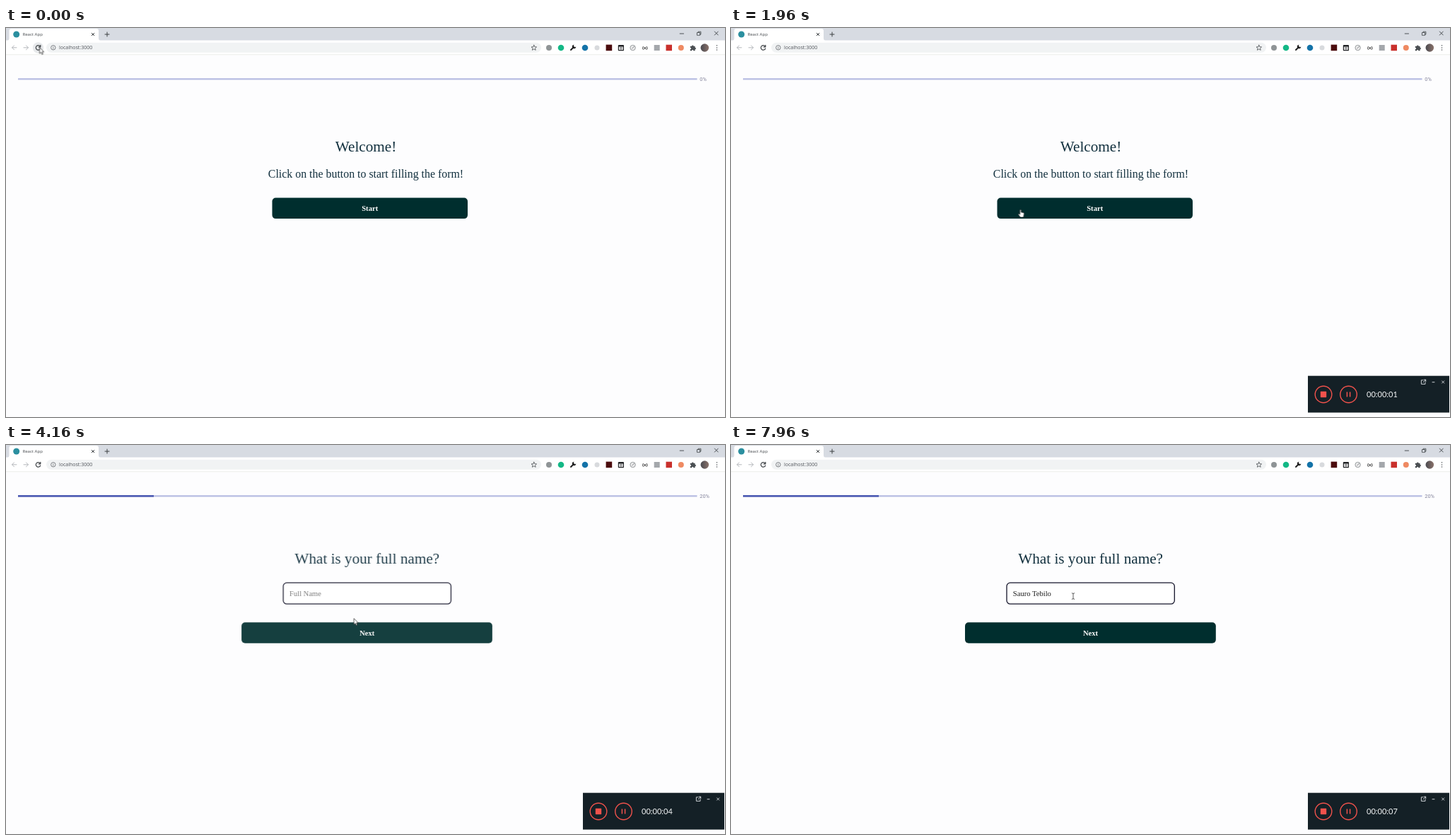
An HTML page that plays this animation: 1017 by 551 pixels, repeating every 8000 ms.

```html
<!DOCTYPE html>
<html lang="en">
<head>
<meta charset="utf-8">
<title>React App</title>
<style>
html, body { margin: 0; width: 100%; height: 100%; overflow: hidden; background: #fdfdfe; }
svg { display: block; width: 1017px; height: 551px; }
.ui { font-family: "Open Sans", "Noto Sans", sans-serif; }
.page { font-family: "Liberation Serif", "Times New Roman", serif; fill: #12303e; }
.page .btn { font-weight: bold; font-size: 10.6px; fill: #fff; }
.h { font-size: 21.2px; }
.mid { text-anchor: middle; }
.pct { font: 7.4px Roboto, sans-serif; fill: #83839b; }
.line { fill: none; stroke-linecap: round; stroke-linejoin: round; }

/* one shared 8 s cycle, held paused and seeked by the script's clock */
.a { animation: 8s linear infinite paused; }
.s { animation: 8s step-end infinite paused; }

#welcome { animation-name: welcome; }
@keyframes welcome {
  0%, 7.74% { opacity: 1; transform: none; }
  7.75%, 10.56% { opacity: 0; transform: translateX(26.5px); animation-timing-function: ease; }
  23.06%, 43.8% { opacity: 1; transform: none; }
  43.81%, 100% { opacity: 0; transform: none; }
}
#question { animation-name: question; }
@keyframes question {
  0%, 43.81% { opacity: 0; transform: translateX(26.5px); animation-timing-function: ease; }
  56.31%, 100% { opacity: 1; transform: none; }
}
#start { animation-name: hover; }
@keyframes hover { 0%, 23.5% { fill: #002e2e; } 38%, 100% { fill: #001f29; } }

#bar { animation-name: bar; }
@keyframes bar { 0%, 44.13% { transform: scaleX(0); } 49.13%, 100% { transform: scaleX(1); } }
#progress { animation-name: blank; }
@keyframes blank { 0% { visibility: visible; } 7.75% { visibility: hidden; } 10.56%, 100% { visibility: visible; } }
#pct0 { animation-name: pct0; }
@keyframes pct0 { 0% { opacity: 1; } 43.81%, 100% { opacity: 0; } }
#pct20 { animation-name: pct20; }
@keyframes pct20 { 0% { opacity: 0; } 43.81%, 100% { opacity: 1; } }

#fav { animation-name: fav; transform-origin: 14.7px 9px; }
@keyframes fav { 0% { transform: none; } 5% { transform: scale(.6); } 20%, 100% { transform: none; } }
#reload { animation-name: reload; }
@keyframes reload { 0% { opacity: 1; } 4.25% { opacity: 0; } 21.5%, 100% { opacity: 1; } }
#halt { animation-name: halt; }
@keyframes halt { 0% { opacity: 0; } 4.25% { opacity: 1; } 21.5%, 100% { opacity: 0; } }
#glow { animation-name: glow; }
@keyframes glow { 0%, 18.5% { opacity: 1; } 20.5%, 100% { opacity: 0; } }
#dim { animation-name: dim; }
@keyframes dim { 0% { opacity: 1; } 7.75% { opacity: .5; } 21.5%, 100% { opacity: 1; } }
#status { animation-name: status; }
@keyframes status { 0%, 8% { opacity: 0; } 8.5%, 21.5% { opacity: 1; } 23%, 100% { opacity: 0; } }
#rec { animation-name: rec; }
@keyframes rec { 0%, .5% { opacity: 0; } 3%, 100% { opacity: 1; } }

#mouse { animation-name: mouse; }
@keyframes mouse {
  0%, 17.5% { transform: translate(47.5px, 27.5px); animation-timing-function: ease-in-out; }
  24%, 25.5% { transform: translate(409.5px, 257px); animation-timing-function: ease-in-out; }
  36.25%, 50.5% { transform: translate(494px, 253px); animation-timing-function: ease-in-out; }
  55.5%, 100% { transform: translate(484px, 214px); }
}
#arrow { animation-name: arrow; }
@keyframes arrow { 0% { opacity: 1; } 23.3% { opacity: 0; } 51.5% { opacity: 1; } 53%, 100% { opacity: 0; } }
#hand { animation-name: hand; }
@keyframes hand { 0% { opacity: 0; } 23.3% { opacity: 1; } 51.5%, 100% { opacity: 0; } }
#beam { animation-name: beam; }
@keyframes beam { 0% { opacity: 0; } 53% { opacity: 1; } 64.5% { opacity: 0; } 99.4%, 100% { opacity: 1; } }
#ring { animation-name: ring; }
@keyframes ring {
  0%, 3%, 8.5%, 42.5%, 48%, 56.75%, 62.25%, 100% { opacity: 0; transform: scale(.2); }
  4.25%, 6.5%, 43.75%, 46%, 58%, 60.25% { opacity: 1; transform: none; }
  8.4%, 47.9%, 62.15% { opacity: 0; transform: none; }
}
</style>
</head>
<body>
<svg viewBox="0 0 1017 551">
  <rect width="1017" height="551" fill="#fdfdfe"/>

  <!-- browser frame -->
  <g class="ui">
    <rect width="1017" height="18" fill="#d7dbe2"/>
    <path d="M2 18q2.500-.5 2.500-3V4q0-3 3-3H128q3 0 3 3v11q0 2.500 2.500 3z" fill="#fff"/>
    <rect y="17.500" width="1017" height="20" fill="#fff"/>
    <rect y="37.500" width="1017" height=".7" fill="#e4e5e2"/>
    <circle id="fav" class="s" cx="14.700" cy="9" r="4.500" fill="#2b8f9f"/>
    <text x="23.400" y="11.300" font-size="6.100" fill="#45494d">React App</text>
    <g class="line" stroke="#3c4043" stroke-width="1">
      <path d="M121.200 7.200l3.600 3.600m0-3.600l-3.600 3.600M140 9h6m-3-3v6"/>
      <path d="M953.200 8h5.300M1002.300 5l5 5m0-5l-5 5" stroke-width=".9"/>
      <path d="M977.800 6.500h3.800v3.800h-3.800zM979 6.300V5.200h3.900v3.900h-1.200" stroke-width=".8"/>
    </g>
    <circle id="glow" class="a" cx="45.500" cy="28" r="7.700" fill="#e7e9eb"/>
    <g class="line" stroke="#b4b7bb" stroke-width="1">
      <path d="M15 27.800H8.500m3-3l-3 3 3 3M25 27.800h6.500m-3-3l3 3-3 3"/>
      <path id="halt" class="s" d="M42.700 25l5.600 5.600m0-5.600l-5.600 5.600" stroke="#8e9296"/>
      <path id="reload" class="s" d="M48.300 26A3.300 3.300 0 1 0 48.700 29M48.800 24.300v2.500h-2.500" stroke="#3f4347" stroke-width="1.200"/>
    </g>
    <rect x="57" y="20.800" width="700" height="14" rx="7" fill="#f1f3f4"/>
    <circle cx="66.800" cy="27.800" r="3.200" fill="none" stroke="#5f6368" stroke-width=".8"/>
    <path d="M66.800 27.300v2.200m0-3.600v.7" stroke="#5f6368" stroke-width=".8"/>
    <text x="75" y="30.300" font-size="7" fill="#50545a">localhost:3000</text>
    <path class="line" d="M746.800 24.200l1.100 2.500 2.700.2-2.100 1.800.7 2.600-2.400-1.400-2.400 1.400.7-2.600-2.100-1.800 2.700-.2z" stroke="#4a4e52" stroke-width=".8"/>

    <!-- toolbar buttons -->
    <circle cx="768" cy="28" r="4" fill="#8f9496"/>
    <circle cx="785" cy="28" r="4.300" fill="#14b886"/>
    <path class="line" d="M799 31l4-4" stroke="#222" stroke-width="2"/>
    <path d="M803.500 23.800a2.700 2.700 0 1 0 2.700 2.700l-1.900.7-1.500-1.500z" fill="#222"/>
    <circle cx="819" cy="28" r="4.300" fill="#1473a8"/>
    <circle cx="836" cy="28" r="3.500" fill="#d8dadd"/>
    <rect id="dim" class="s" x="848.600" y="23.600" width="8.600" height="8.600" fill="#4b0b0d"/>
    <rect x="865.800" y="24" width="8.200" height="8.200" rx="1" fill="#202124"/>
    <path d="M867 26.500h5.800v4.500H867z" fill="#fff"/>
    <path d="M868 27.700h3.800m-3.800 2h3.800" stroke="#202124" stroke-width=".8"/>
    <circle cx="886.600" cy="28" r="3.700" fill="#eee" stroke="#8c9094" stroke-width=".9"/>
    <path class="line" d="M885.800 29l2.600-3" stroke="#75797d" stroke-width=".9"/>
    <text class="mid" x="903.800" y="30" font-size="6" font-weight="700" fill="#333">{x}</text>
    <rect x="916.700" y="24" width="8" height="8" fill="#a4a7ab"/>
    <rect x="933.500" y="23.700" width="8.500" height="8.500" fill="#c9302c"/>
    <circle cx="954.800" cy="28" r="4" fill="#ef8a62"/>
    <path d="M967.800 25.700h2.200a1.300 1.300 0 0 1 2.600 0h2v2a1.300 1.300 0 0 1 0 2.600v2h-2.200a1.200 1.200 0 0 0-2.400 0h-2.200v-2.200a1.200 1.200 0 0 0 0-2.400z" fill="#4b4f53"/>
    <defs><linearGradient id="tone"><stop stop-color="#4a4a50"/><stop offset="1" stop-color="#8a726a"/></linearGradient></defs>
    <circle cx="988.300" cy="28" r="5.800" fill="url(#tone)"/>
    <path d="M1005.500 24.800v.01m0 3.090v.01m0 3.090v.01" class="line" stroke="#4b4f53" stroke-width="1.500"/>
  </g>

  <!-- progress -->
  <g id="progress" class="s">
    <rect x="17" y="71.200" width="960.500" height="2.200" fill="#b6bce2"/>
    <g transform="translate(17 71.200)"><rect id="bar" class="a" width="192" height="2.200" fill="#3949ab"/></g>
    <text id="pct0" class="pct s" x="981.300" y="74.800">0%</text>
    <text id="pct20" class="pct s" x="981.300" y="74.800">20%</text>
  </g>

  <g id="welcome" class="page a">
    <text class="h mid" x="509" y="175">Welcome!</text>
    <text class="mid" x="509" y="211.500" font-size="15.900">Click on the button to start filling the form!</text>
    <rect id="start" class="a" x="376.500" y="240.500" width="276.500" height="29.600" rx="5"/>
    <text class="btn mid" x="514.700" y="258.600">Start</text>
  </g>

  <g id="question" class="page a">
    <text class="h mid" x="508.600" y="168">What is your full name?</text>
    <rect x="390" y="195.200" width="237.300" height="30" rx="5" fill="#fff" stroke="#14142a" stroke-width="1.300"/>
    <text id="hint" x="398.800" y="213.500" font-size="10.600" fill="#757575">Full Name</text>
    <text id="typed" x="398.800" y="213.500" font-size="10.600" fill="#1c1c1c"></text>
    <rect id="caret" y="204.500" width=".7" height="11.500" fill="#111"/>
    <rect x="331" y="251.200" width="354.800" height="29.500" rx="5" fill="#002e2e"/>
    <text class="btn mid" x="508.500" y="269.800">Next</text>
  </g>

  <g id="status" class="ui a">
    <path d="M0 540h336q2.500 0 2.500 2.500V551H0z" fill="#dcdee1"/>
    <text x="2.800" y="548" font-size="5.950" fill="#4c5054">Connecting...</text>
  </g>

  <!-- recorder -->
  <g id="rec" class="a">
    <rect x="816" y="492.700" width="200" height="52" fill="#142026"/>
    <g fill="none" stroke="#f0524c" stroke-width="1.400">
      <circle cx="838" cy="519" r="11.800"/>
      <circle cx="873.500" cy="519" r="11.800"/>
      <path d="M871.400 515.500v7m4.200-7v7" stroke-width="1.500"/>
    </g>
    <rect x="833.800" y="514.800" width="8.400" height="8.400" rx=".6" fill="#f0524c"/>
    <text id="clock" x="899" y="523" font-size="11" font-family="Lato, sans-serif" fill="#f4f6f7">00:00:00</text>
    <g class="line" stroke="#dfe3e6" stroke-width=".9">
      <path d="M979 498.800h-2.600v5.600h5.600v-2.600M980.300 498.200h2.400v2.400m0-2.400l-3.600 3.600"/>
      <path d="M992 501.700h3M1005.600 499.900l3.200 3.200m0-3.200l-3.200 3.200"/>
    </g>
  </g>

  <g id="mouse" class="a">
    <g transform="translate(-1 -.8)">
      <g id="ring" class="a" fill="none" stroke="#35c9c2">
        <circle r="11" stroke-width="2.300" stroke="#56d3cd"/>
        <circle r="7" stroke-width="3"/>
        <circle r="2.700" fill="#35c9c2" stroke="none"/>
      </g>
    </g>
    <path id="arrow" class="s" d="M0 0V8.700L2 6.900 3.400 10l1.500-.7L3.500 6.300H6.200z" fill="#fff" stroke="#222" stroke-width=".7"/>
    <path id="hand" class="s" d="M-.8.8Q0-.5.9.8V4l3 .6q1.300.3 1.200 1.500L4.500 9.200 4 11H-.2L-2.900 7.300q-.5-1.200.7-1.200L-.8 7.200z" fill="#fff" stroke="#222" stroke-width=".6"/>
    <path id="beam" class="s line" d="M-1.700-4.200Q0-4.200 0-3.200 0-4.200 1.700-4.200M0-3.200V3.400M-1.700 4.400Q0 4.400 0 3.400 0 4.400 1.700 4.400" stroke="#333" stroke-width=".8"/>
  </g>
</svg>
<script>
const $ = id => document.getElementById(id);
const LOOP = 8000, NAME = "Sauro Tebilo";
const KEYS = [5160, 5360, 5760, 5960, 6080, 6200, 6560, 6840, 6960, 7120, 7320, 7320];
const BLINK = 530, FOCUS = 4560;
const motions = document.getAnimations();

function show(t) {
  for (const m of motions) m.currentTime = t;

  const count = KEYS.filter(k => k <= t).length;
  const typed = $("typed");
  typed.textContent = NAME.slice(0, count);
  $("hint").style.opacity = count ? 0 : 1;

  // the caret restarts its blink after each key
  const since = t - (count ? KEYS[count - 1] : FOCUS);
  const lit = since >= 0 && Math.floor(since / BLINK) % 2 === 0;
  $("caret").style.opacity = lit ? 1 : 0;
  $("caret").setAttribute("x", 398.8 + (count ? typed.getComputedTextLength() : 0));

  const secs = Math.max(0, Math.floor((t - 100) / 1000));
  $("clock").textContent = "00:00:0" + secs;
}

const begin = performance.now();
function tick() {
  show((performance.now() - begin) % LOOP);
  requestAnimationFrame(tick);
}
tick();
</script>
</body>
</html>
```
